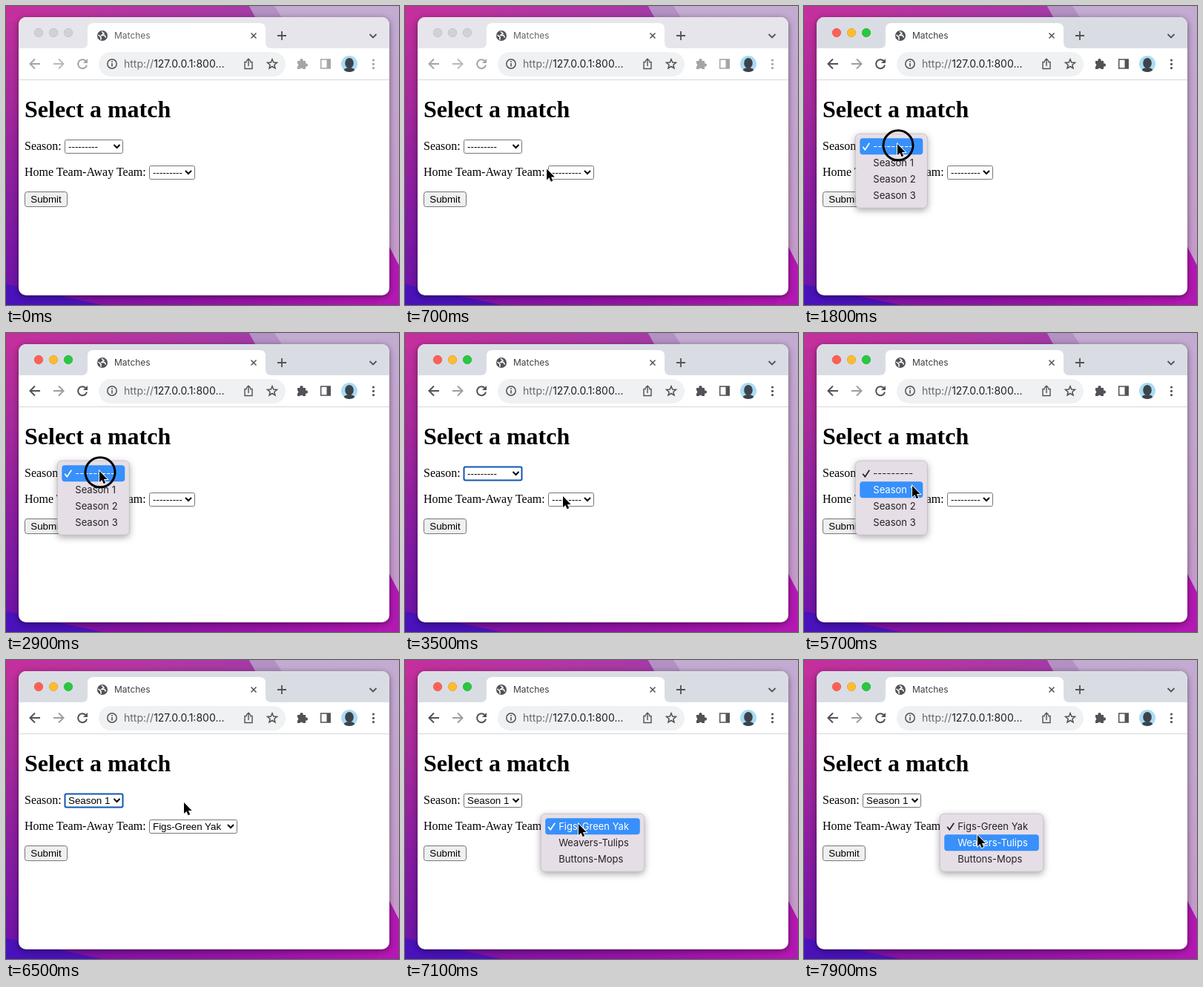
Write an HTML page that moves like this. It is 530x403 px and loops after 8 s.

```html
<!DOCTYPE html>
<html lang="en">
<head>
<meta charset="utf-8">
<title>Matches</title>
<style>
  html, body { margin: 0; width: 100%; height: 100%; overflow: hidden; }
  svg { display: block; width: 530px; height: 403px; }
  text { white-space: pre; }
  .ui { font-family: Inter, "Liberation Sans", sans-serif; }
  .page { font: 16px "Liberation Serif", "Times New Roman", serif; }
  .form { font: 13.333px "Liberation Sans", Arial, sans-serif; }
  .line { fill: none; stroke: var(--icon); stroke-width: 2; }
  .thin { stroke-width: 1.5; }
  #window { --icon: #505357; --off: #9b9ea2; --bar: #d9dde3; --field: #eff1f2; --tab: #3c4043; }
  #window.idle { --icon: #a4a5a9; --off: #b9babd; --bar: #e6e5eb; --tab: #626469; }
  .idle .light { fill: #d2d1d6; stroke: #bbbabf; }
  .box { fill: #fff; stroke: #767676; }
  .focus .box { stroke: #1056b5; stroke-width: 2; }
  .menu { font-size: 13px; filter: drop-shadow(0 3px 5px #0005); }
  .menu .panel { fill: #e6dee6; stroke: #bfb8c1; stroke-width: .7; }
  .row rect { fill: none; }
  .row text { fill: #242126; }
  .row path { fill: none; stroke: #242126; stroke-width: 1.7; }
  .on rect { fill: #3790fb; }
  .on text { fill: #fff; }
  .on path { stroke: #fff; }
</style>
</head>
<body>
<svg viewBox="0 0 530 403">
  <defs>
    <linearGradient id="sky" x2="0" y2="1">
      <stop offset="0" stop-color="#c52f9d"/>
      <stop offset=".3" stop-color="#a82a9c"/>
      <stop offset=".6" stop-color="#8c1ea0"/>
      <stop offset="1" stop-color="#6a12aa"/>
    </linearGradient>
    <linearGradient id="top">
      <stop offset="0" stop-color="#c52f9d"/>
      <stop offset="1" stop-color="#a43ba7"/>
    </linearGradient>
    <linearGradient id="floor">
      <stop offset="0" stop-color="#7d12a5"/>
      <stop offset=".6" stop-color="#9a14a8"/>
      <stop offset="1" stop-color="#b516b4"/>
    </linearGradient>
    <linearGradient id="pale" x2="0" y2="1">
      <stop offset="0" stop-color="#c3abd2"/>
      <stop offset="1" stop-color="#c69acb"/>
    </linearGradient>
    <clipPath id="frame"><rect x="17" y="15" width="500" height="375" rx="10"/></clipPath>
    <clipPath id="face"><circle cx="463" cy="78" r="11"/></clipPath>
  </defs>

  <rect width="530" height="403" fill="url(#sky)"/>
  <path d="M0 0H340V20H0Z" fill="url(#top)"/>
  <path d="M60 385H530V403H60Z" fill="url(#floor)"/>
  <path d="M0 375L60 388L130 403H0Z" fill="#4a12ba"/>
  <path d="M328 0H530V350L517 325L345 30Z" fill="url(#pale)"/>
  <path d="M328 0H362L375 20H339Z" fill="#b391c4"/>
  <path d="M517 325L530 350V403H500Z" fill="#b318b3"/>

  <g id="window">
    <rect x="17" y="15" width="500" height="375" rx="10" fill="#fff" style="filter:drop-shadow(0 2px 4px #0007)"/>
    <g clip-path="url(#frame)" class="ui">
      <rect x="17" y="15" width="500" height="43" fill="var(--bar)"/>
      <path d="M102 57Q110 57 110 49V31Q110 23 118 23H342Q350 23 350 31V49Q350 57 358 57V58H102Z" fill="#fff"/>
      <rect x="17" y="57" width="500" height="42" fill="#fff"/>
      <path d="M17 99.5H517" stroke="#d6d8db"/>

      <circle class="light" cx="44" cy="36" r="5.7" fill="#fe5f57" stroke="#e24b41" stroke-width=".7"/>
      <circle class="light" cx="64" cy="36" r="5.7" fill="#febc2e" stroke="#e0a028" stroke-width=".7"/>
      <circle class="light" cx="84" cy="36" r="5.7" fill="#28c840" stroke="#1fac31" stroke-width=".7"/>

      <circle cx="130" cy="40" r="7" fill="#505357"/>
      <path d="M124.500 39L128 42V45.500M129 34.500L132 37L129 39.500H133L134.500 42.500" fill="none" stroke="#fff" stroke-width="1.6"/>
      <text x="146" y="44.400" font-size="12" fill="var(--tab)">Matches</text>
      <path d="M330.500 36.500L337.500 43.500M337.500 36.500L330.500 43.500" fill="none" stroke="#505357" stroke-width="1.5"/>
      <path d="M366 40H378M372 34V46M490.500 38L495 42.500L499.500 38" fill="none" stroke="#505357" stroke-width="1.8"/>

      <path class="line" d="M46 78H33M39 71.500L32.500 78L39 84.500"/>
      <path class="line" d="M64 78H77M71 71.500L77.500 78L71 84.500" style="stroke:var(--off)"/>
      <path class="line" d="M107.500 74A6 6 0 1 0 109 79.500"/>
      <path d="M110 71V77H104Z" fill="var(--icon)"/>

      <rect x="125" y="62" width="252" height="33" rx="16.500" fill="var(--field)"/>
      <circle cx="143" cy="78" r="6.200" fill="none" stroke="#505357" stroke-width="1.500"/>
      <path d="M143 77V81.500M143 74V75.700" stroke="#505357" stroke-width="1.600"/>
      <text x="159" y="83" font-size="14" fill="#666a6e">http://<tspan fill="#202124">127.0.0.1:800...</tspan></text>
      <path d="M325 75.500H322V84.500H332V75.500H329M327 81V71.500M324 74.200L327 71.200L330 74.200" fill="none" stroke="#505357" stroke-width="1.400"/>
      <path id="star" fill="none" stroke="#505357" stroke-width="1.500"/>

      <path d="M393 74H396.500A2.200 2.200 0 1 1 400.500 74H404V77.500A2.200 2.200 0 1 1 404 81.500V85H400.500A2.200 2.200 0 0 0 396.500 85H393V81.500A2.200 2.200 0 0 0 393 77.500Z" fill="var(--icon)"/>
      <rect class="line thin" x="424.700" y="72" width="12.500" height="12"/>
      <path d="M432.500 72H437V84H432.500Z" fill="var(--icon)"/>
      <g clip-path="url(#face)">
        <rect x="452" y="67" width="22" height="22" fill="#a9dcf3"/>
        <path d="M454 90Q455 83 463 83Q471 83 472 90Z" fill="#3c434b"/>
        <ellipse cx="463" cy="77" rx="5.800" ry="7" fill="#3c434b"/>
      </g>
      <g fill="var(--icon)">
        <circle cx="495.500" cy="73" r="1.600"/><circle cx="495.500" cy="78.300" r="1.600"/><circle cx="495.500" cy="83.600" r="1.600"/>
      </g>
    </g>

    <g class="page">
      <text x="25" y="150" font-size="32" font-weight="bold">Select a match</text>
      <text x="25" y="194">Season:</text>
      <text x="25" y="229">Home Team-Away Team:</text>
    </g>
    <g class="form">
      <g id="season">
        <rect class="box" x="79.500" y="180.500" width="78" height="18" rx="2"/>
        <text x="84" y="194"></text>
        <path d="M145.500 187L149.500 191L153.500 187" fill="none" stroke="#000" stroke-width="2"/>
      </g>
      <g id="home">
        <rect class="box" x="193.500" y="215.500" height="18" rx="2"/>
        <text x="198" y="229"></text>
        <path d="M-4 222L0 226L4 222" fill="none" stroke="#000" stroke-width="2"/>
      </g>
      <rect x="25.500" y="250.500" width="57" height="20" rx="3" fill="#efefef" stroke="#767676"/>
      <text x="54" y="265" text-anchor="middle">Submit</text>
    </g>
  </g>

  <g id="menus" class="ui"></g>
  <g id="pointer">
    <circle id="ring" cx="1" cy="1.800" r="20" fill="none" stroke="#000" stroke-width="3"/>
    <path d="M0 0V15L3.400 11.900L5.700 17.200L8.200 16.100L5.900 11H10.700Z" fill="#000" stroke="#fff" paint-order="stroke" stroke-width="1.800"/>
  </g>
</svg>

<script>
const LOOP = 8000, STEP = 100, ROW = 22;
const BLANK = '---------';
const SEASONS = [BLANK, 'Season 1', 'Season 2', 'Season 3'];
const MATCHES = ['Figs-Green Yak', 'Weavers-Tulips', 'Buttons-Mops'];
const $ = id => document.getElementById(id);

// Pointer stops: time, x, y
const PATH = [
  [100, 300, 400], [900, 171, 186], [1500, 171, 186], [1600, 126, 186],
  [3200, 126, 186], [3500, 213, 220], [4100, 213, 220], [4300, 213, 191],
  [5200, 213, 191], [5400, 146, 187], [5500, 146, 187], [5700, 146, 206],
  [6100, 146, 206], [6300, 236, 194], [6400, 236, 194], [6500, 240, 192],
  [6700, 234, 221], [7700, 234, 221], [7900, 234, 236], [LOOP, 234, 236]
];
const CLICKS = [[1000, 1300], [1800, 2100], [2900, 3200], [3800, 4000],
  [4600, 4900], [5400, 5700], [5800, 6100], [6800, 7100]];

const within = (t, spans) => spans.some(([a, b]) => t >= a && t < b);

function svg(tag, attrs, parent, text = '') {
  const el = document.createElementNS('http://www.w3.org/2000/svg', tag);
  for (const k in attrs) el.setAttribute(k, attrs[k]);
  el.textContent = text;
  return parent.appendChild(el);
}

// Each span is the time of opening and the time the fade-out starts
function makeMenu(x, y, width, items, spans) {
  const group = svg('g', { class: 'menu' }, $('menus'));
  svg('rect', { class: 'panel', x, y, width, height: items.length * ROW + 12, rx: 6 }, group);
  const rows = items.map((label, i) => {
    const top = y + 6 + i * ROW;
    const row = svg('g', { class: 'row' }, group);
    svg('rect', { x: x + 6, y: top, width: width - 12, height: ROW, rx: 4 }, row);
    if (!i) svg('path', { d: `M${x + 10} ${top + 11.5}l3 4l6 -9` }, row);
    svg('text', { x: x + 24, y: top + 15.6 }, row, label);
    return row;
  });
  return { group, rows, x, y, width, spans };
}

const menus = [
  makeMenu(69.3, 172.2, 97, SEASONS, [[1800, 3200], [5400, 6100]]),
  makeMenu(183.2, 207.2, 95.6, [BLANK], [[3800, 4700]]),
  makeMenu(183.2, 207.2, 139.6, MATCHES, [[6800, LOOP]])
];

$('star').setAttribute('d', 'M' + Array.from({ length: 10 }, (_, i) => {
  const r = i % 2 ? 3 : 6.8, a = i * Math.PI / 5;
  return `${359 + r * Math.sin(a)} ${78.5 - r * Math.cos(a)}`;
}).join('L') + 'Z');

function pointerAt(t) {
  const i = Math.max(1, PATH.findIndex(p => p[0] > t));
  const [t0, x0, y0] = PATH[i - 1], [t1, x1, y1] = PATH[i];
  const k = Math.max(0, (t - t0) / (t1 - t0));
  const ease = k * k * (3 - 2 * k);
  return [x0 + (x1 - x0) * ease, y0 + (y1 - y0) * ease];
}

function drawMenu(menu, t, [px, py]) {
  const span = menu.spans.find(([a, b]) => t >= a && t < b + 200);
  menu.group.style.display = span ? '' : 'none';
  if (!span) return;
  menu.group.style.opacity = t < span[1] ? 1 : t < span[1] + 100 ? .6 : .2;
  const inside = px > menu.x && px < menu.x + menu.width;
  const hit = inside ? Math.floor((py - menu.y - 6) / ROW) : -1;
  menu.rows.forEach((row, i) => row.classList.toggle('on', i === hit));
}

function drawSelect(id, label, focused) {
  const el = $(id);
  el.classList.toggle('focus', focused);
  el.querySelector('text').textContent = label;
  return el;
}

function render(now) {
  const t = Math.floor(now % LOOP / STEP) * STEP;
  const pos = pointerAt(t);
  const chosen = t >= 6200;

  $('window').classList.toggle('idle', t < 1000);
  drawSelect('season', SEASONS[chosen ? 1 : 0], within(t, [[1800, 3800], [5400, 6800]]));
  const home = drawSelect('home', chosen ? MATCHES[0] : BLANK, within(t, [[3800, 5400], [6800, LOOP]]));
  const width = chosen ? 118 : 61;
  home.querySelector('rect').setAttribute('width', width);
  home.querySelector('path').setAttribute('transform', `translate(${185 + width})`);

  menus.forEach(menu => drawMenu(menu, t, pos));
  $('pointer').style.display = t < 100 ? 'none' : '';
  $('pointer').setAttribute('transform', `translate(${pos})`);
  $('ring').style.display = within(t, CLICKS) ? '' : 'none';
}

const start = performance.now();
function tick() {
  render(performance.now() - start);
  requestAnimationFrame(tick);
}
tick();
</script>
</body>
</html>
```
